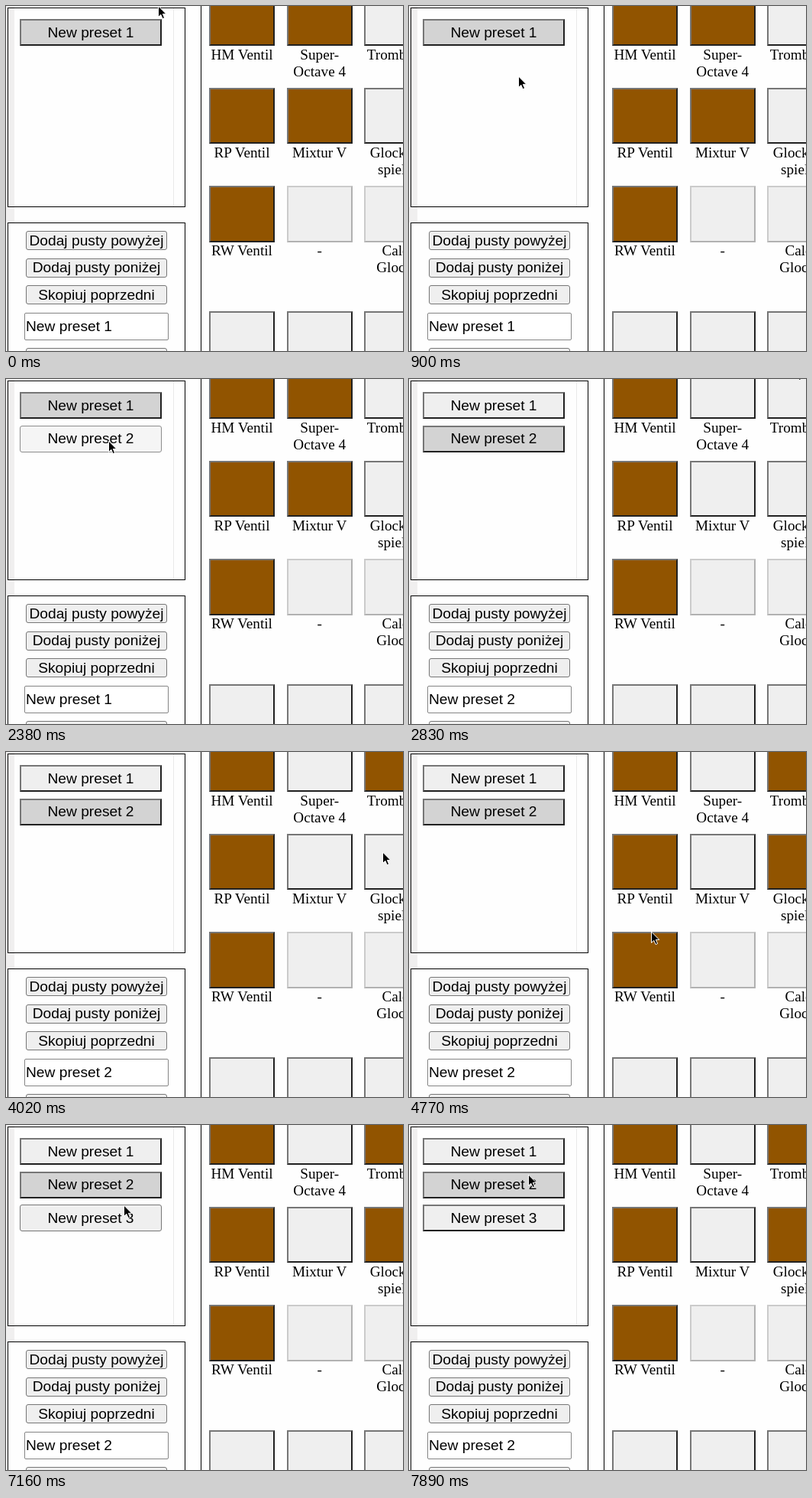
Animation, 520 px wide and 451 px high, one loop 8000 ms. Source, as an HTML page:

```html
<!DOCTYPE html>
<html lang="pl">
<head>
<meta charset="utf-8">
<title>Presets</title>
<style>
html, body { margin: 0; width: 100%; height: 100%; overflow: hidden; background: #fff; }
#stage { position: relative; width: 520px; height: 451px; overflow: hidden; background: #fefefe;
  font: 19.2px/22px "Liberation Sans", Arial, sans-serif; color: #000; }
#stage > * { position: absolute; box-sizing: border-box; white-space: pre; }
.panel { border: 1px solid #000; }
.strip { background: #f0efef; }
.line { background: #e9e9e9; }
.rule { background: #000; }
.btn { display: flex; align-items: center; justify-content: center;
  background: #efefef; border: 1px solid #767676; border-radius: 3px; }
.btn.hover { background: #e0e0e0; border-color: #4f4f4f; }
.btn.press { background: #f5f5f5; border-color: #8d8d8d; }
.btn.set { background: #efefef; border: 2px solid; border-color: #767676 #212121 #212121 #767676; border-radius: 0; }
.btn.set.press { border-color: #212121 #767676 #767676 #212121; }
.btn.off { border-color: #cbcbcb #b1b1b1 #b1b1b1 #cbcbcb; }
.btn.sel { background: #d3d3d3; }
.btn.on { background: #915400; }
.field { display: flex; align-items: center; padding-left: 1px; background: #fff;
  border: 1px solid #858585; border-radius: 2px; }
.label { font-family: "Liberation Serif", "Times New Roman", serif; text-align: center; }
#cursor { left: 0; top: 0; overflow: visible; }
</style>
</head>
<body>
<div id="stage"></div>
<script>
const stage = document.getElementById('stage');

function add(cls, x, y, w, h, text = '') {
  const el = document.createElement('div');
  el.className = cls;
  el.style.cssText = `left:${x}px;top:${y}px;width:${w}px;height:${h}px`;
  el.textContent = text;
  stage.append(el);
  return el;
}

const buttons = [];
function button(x, y, w, h, text = '', cls = '') {
  const el = add('btn ' + cls, x, y, w, h, text);
  buttons.push({ el, x, y, w, h });
  return el;
}

// Left column
add('strip', 0, 0, 11, 283);
add('line', 219, 3, 1, 259);
add('panel', 2, 2, 233, 261);
add('panel', 2, 283, 233, 300);
add('rule', 255, 0, 1, 451);

const title = i => 'New preset ' + (i + 1);
const presets = [0, 1, 2].map(i => button(18, 17 + 43.5 * i, 186, 35, title(i)));
['Dodaj pusty powyżej', 'Dodaj pusty poniżej', 'Skopiuj poprzedni']
  .forEach((text, i) => button(26, 294.4 + 35.5 * i, 185, 25, text));
const field = add('field', 24, 401, 189, 36);
button(26, 447, 185, 25);

// Organ stops
const labels = [
  ['HM Ventil', 'Super-\nOctave 4', 'Trombone'],
  ['RP Ventil', 'Mixtur V', 'Glocken-\nspiel 2'],
  ['RW Ventil', '-', 'Calc.\nGlocks'],
  ['', '', '']
];
const stops = labels.map((row, r) => row.map((text, c) => {
  const x = 266 + 101.7 * c;
  const y = r < 3 ? 128.3 * r - 21.3 : 399;
  add('label', x - 17, y + 74, 120, 44, text);
  return button(x, y, 86.4, 73.3, '', r === 2 && c ? 'set off' : 'set');
}));

stage.insertAdjacentHTML('beforeend', `<svg id="cursor" width="12" height="20">
  <path d="M.5 1V15.4L3.8 12.3L6.1 17.6L8.6 16.5L6.3 11.4H10.8Z" stroke="#fff" stroke-width="1"/></svg>`);
const cursor = document.getElementById('cursor');

// Pointer visits, timed in steps; a click is pressed one step before leaving
const select = i => s => { s.sel = i; s.used[i] = true; };
const addPreset = s => { s.count++; };
const pull = r => s => { s.pulled[r] = true; };
const visit = (arrive, leave, x, y, click) => ({ arrive, leave, x, y, click });
const visits = [
  visit(0, 0, 199, -1),
  visit(2, 4, 150, 30, select(0)),
  visit(11, 13, 116, 338, addPreset),
  visit(16, 17, 134, 80, select(1)),
  visit(19, 19, 505, -16),
  visit(22, 25, 490, 22, pull(0)),
  visit(27, 29, 493, 130, pull(1)),
  visit(35, 40, 140, 338, addPreset),
  visit(46, 47, 164, 39),
  visit(48, 48, 154, 104),
  visit(49, 50, 152, 114, select(2)),
  visit(52, 53, 156, 64, select(1))
];

const smooth = f => f * f * (3 - 2 * f);

function pointer(n) {
  const i = visits.findLastIndex(v => n >= v.arrive);
  const from = visits[i], to = visits[i + 1];
  if (!to || n <= from.leave) return [from.x, from.y];
  const f = smooth((n - from.leave) / (to.arrive - from.leave));
  return [from.x + (to.x - from.x) * f, from.y + (to.y - from.y) * f].map(Math.round);
}

function stateAt(n) {
  const s = { sel: 0, count: 1, used: [true], pulled: [] };
  for (const v of visits) if (v.click && n >= v.leave) v.click(s);
  return s;
}

function isOn({ sel, pulled }, r, c) {
  if (c === 0) return r < 3;
  if (c === 1) return r < 2 && sel === 0;
  return sel === 1 && !!pulled[r];
}

function show(n) {
  const [px, py] = pointer(n);
  const s = stateAt(n);
  presets.forEach((el, i) => {
    el.style.visibility = i < s.count ? 'visible' : 'hidden';
    el.classList.toggle('set', !!s.used[i]);
    el.classList.toggle('sel', i === s.sel);
  });
  field.textContent = title(s.sel);
  stops.forEach((row, r) => row.forEach((el, c) => el.classList.toggle('on', isOn(s, r, c))));

  const down = visits.some(v => v.click && n === v.leave - 1);
  for (const { el, x, y, w, h } of buttons) {
    const over = px > x && px < x + w && py > y && py < y + h;
    el.classList.toggle('hover', over && !el.classList.contains('set'));
    el.classList.toggle('press', over && down);
  }
  cursor.style.transform = `translate(${px}px,${py}px)`;
}

const LOOP = 8000, STEP = 148.9;
const start = performance.now();
let last = -1;
function tick() {
  const t = (performance.now() - start) % LOOP;
  const n = Math.floor((t + 8) / STEP);
  if (n !== last) show(last = n);
  requestAnimationFrame(tick);
}
tick();
</script>
</body>
</html>
```
